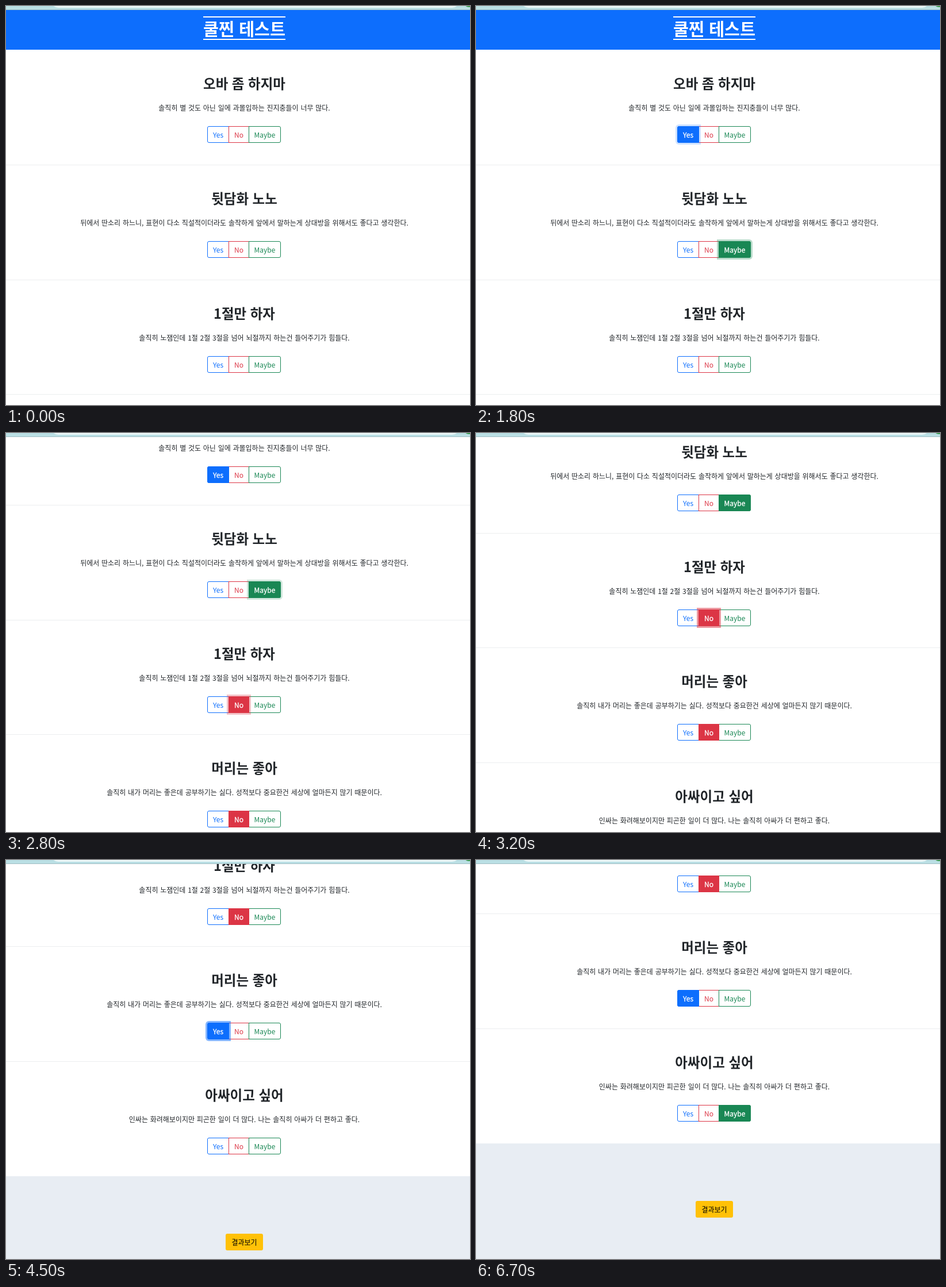
An HTML page that plays this animation: 807x694 px, repeating every 6800 ms.

```html
<!DOCTYPE html>
<html lang="ko">
<head>
<meta charset="utf-8">
<title>쿨찐 테스트</title>
<style>
  * { box-sizing: border-box; margin: 0; }
  html, body { width: 100%; height: 100%; overflow: hidden; background: #fff; }
  body {
    position: relative;
    font: 12px/18px "Noto Sans CJK KR", "Noto Sans KR", "Noto Sans CJK", "Noto Sans", sans-serif;
    color: #212529;
  }

  /* Browser strip above the page */
  .bar {
    position: absolute; z-index: 5; inset: 0 0 auto; height: 7px; overflow: hidden;
    background: #badfe4; border-bottom: 1px solid #a3bfc4;
  }
  .bar::before {
    content: ""; position: absolute; left: 78px; top: -23px; width: 711px; height: 26px;
    border-radius: 13px; background: #edf8f9;
  }
  .bar::after {
    content: ""; position: absolute; left: 796px; top: -16px; width: 18px; height: 18px;
    border-radius: 50%; background: #3c9a50;
  }

  /* The page is a little wider than the stage */
  .page {
    position: absolute; left: 0; top: 7px; width: 829px; text-align: center;
    animation: scroll 6.8s step-end infinite;
  }
  header { height: 69px; padding-top: 11px; background: #0d6efd; }
  h1 {
    display: inline-block; height: 41px; border: solid #fff; border-width: 2px 0;
    font-size: 29.3px; line-height: 36px; font-weight: 700; color: #fff; white-space: nowrap;
  }
  section { position: relative; height: 199.75px; padding-top: 44px; }
  section + section { border-top: 1px solid #eceeef; padding-top: 43px; }
  h2 { font-size: 23.5px; line-height: 29px; font-weight: 700; }
  p { margin-top: 19px; word-spacing: .4px; white-space: nowrap; }

  .group { display: flex; width: 128px; margin: 23px 0 0 350px; isolation: isolate; }
  .group b {
    position: relative; height: 29px; line-height: 27px; font-weight: 400;
    border: 1px solid var(--c); color: var(--c); border-radius: var(--r);
  }
  .group b + b { margin-left: -1px; }
  .yes { width: 38px; --c: #0d6efd; --glow: #0d6efd80; --r: 3px 0 0 3px; }
  .no { width: 36px; --c: #dc3545; --glow: #dc354580; --r: 0; }
  .maybe { width: 56px; --c: #198754; --glow: #19875480; --r: 0 3px 3px 0; }

  /* ::before is the filled state, ::after the focus ring */
  .group b::before, .group b::after {
    position: absolute; inset: -1px; border-radius: var(--r); opacity: 0;
  }
  .group b::before {
    content: attr(data-t); z-index: 1; border: 1px solid var(--c); background: var(--c);
    color: #fff; -webkit-text-stroke: .3px #fff;
    animation: var(--fill, none) 6.8s step-end infinite;
  }
  .group b::after {
    content: ""; z-index: 2; box-shadow: 0 0 0 3px var(--glow);
    animation: var(--ring, none) 6.8s step-end infinite;
  }

  footer { height: 320px; padding-top: 100px; background: #e8edf3; }
  .result {
    display: inline-block; width: 65px; height: 29px; line-height: 29px;
    border-radius: 3px; background: #ffc107; color: #000;
  }

  @keyframes scroll {
    0% { transform: none; }
    29.41% { transform: translateY(-67px); }
    30.88% { transform: translateY(-133px); }
    32.35% { transform: translateY(-151px); }
    45.58% { transform: translateY(-230px); }
    47.05%, 48.52% { transform: translateY(-302px); }
    63.23% { transform: translateY(-340px); }
    64.7% { transform: translateY(-453px); }
    66.17% { transform: translateY(-525px); }
    67.64% { transform: translateY(-527px); }
    69.11% { transform: translateY(-528px); }
    79.41% { transform: translateY(-567px); }
    80.88%, 100% { transform: translateY(-582px); }
  }

  /* The pointer sweeps over the first group from right to left */
  @keyframes maybe1 {
    8.82% { opacity: .6; } 10.29% { opacity: .5; } 11.76% { opacity: .1; }
    13.23% { opacity: .03; } 14.7%, 100% { opacity: 0; }
  }
  @keyframes no1 {
    10.29%, 11.76% { opacity: .6; } 13.23% { opacity: .05; } 14.7%, 100% { opacity: 0; }
  }
  @keyframes yes1 { 11.76% { opacity: .6; } 13.23%, 100% { opacity: 1; } }
  @keyframes ring1 {
    14.7% { opacity: .6; } 16.17% { opacity: 1; }
    26.47% { opacity: .4; } 27.94%, 100% { opacity: 0; }
  }

  @keyframes maybe2 { 22.05% { opacity: .6; } 23.52%, 100% { opacity: 1; } }
  @keyframes ring2 {
    26.47% { opacity: .6; } 27.94% { opacity: 1; }
    41.17% { opacity: .4; } 42.64%, 100% { opacity: 0; }
  }

  @keyframes no3 { 38.23% { opacity: .6; } 39.7%, 100% { opacity: 1; } }
  @keyframes ring3 {
    41.17% { opacity: .6; } 42.64% { opacity: 1; }
    58.82% { opacity: .4; } 60.29%, 100% { opacity: 0; }
  }

  @keyframes no4 { 0% { opacity: 1; } 58.82% { opacity: .4; } 60.29%, 100% { opacity: 0; } }
  @keyframes yes4 { 52.94% { opacity: .6; } 54.41%, 100% { opacity: 1; } }
  @keyframes ring4 {
    58.82% { opacity: .6; } 60.29% { opacity: 1; }
    75% { opacity: .4; } 76.47%, 100% { opacity: 0; }
  }

  @keyframes maybe5 { 73.52% { opacity: .6; } 75%, 100% { opacity: 1; } }
  @keyframes ring5 {
    75% { opacity: .6; } 76.47% { opacity: 1; } 98.52%, 100% { opacity: 0; }
  }
</style>
</head>
<body>
<div class="bar"></div>
<main class="page">
  <header><h1>쿨찐 테스트</h1></header>

  <section>
    <h2>오바 좀 하지마</h2>
    <p>솔직히 별 것도 아닌 일에 과몰입하는 진지충들이 너무 많다.</p>
    <div class="group">
      <b class="yes" data-t="Yes" style="--fill: yes1; --ring: ring1">Yes</b>
      <b class="no" data-t="No" style="--fill: no1">No</b>
      <b class="maybe" data-t="Maybe" style="--fill: maybe1">Maybe</b>
    </div>
  </section>

  <section>
    <h2>뒷담화 노노</h2>
    <p>뒤에서 딴소리 하느니, 표현이 다소 직설적이더라도 솔작하게 앞에서 말하는게 상대방을 위해서도 좋다고 생각한다.</p>
    <div class="group">
      <b class="yes" data-t="Yes">Yes</b>
      <b class="no" data-t="No">No</b>
      <b class="maybe" data-t="Maybe" style="--fill: maybe2; --ring: ring2">Maybe</b>
    </div>
  </section>

  <section>
    <h2>1절만 하자</h2>
    <p>솔직히 노잼인데 1절 2절 3절을 넘어 뇌절까지 하는건 들어주기가 힘들다.</p>
    <div class="group">
      <b class="yes" data-t="Yes">Yes</b>
      <b class="no" data-t="No" style="--fill: no3; --ring: ring3">No</b>
      <b class="maybe" data-t="Maybe">Maybe</b>
    </div>
  </section>

  <section>
    <h2>머리는 좋아</h2>
    <p>솔직히 내가 머리는 좋은데 공부하기는 싫다. 성적보다 중요한건 세상에 얼마든지 많기 때문이다.</p>
    <div class="group">
      <b class="yes" data-t="Yes" style="--fill: yes4; --ring: ring4">Yes</b>
      <b class="no" data-t="No" style="--fill: no4">No</b>
      <b class="maybe" data-t="Maybe">Maybe</b>
    </div>
  </section>

  <section>
    <h2>아싸이고 싶어</h2>
    <p>인싸는 화려해보이지만 피곤한 일이 더 많다. 나는 솔직히 아싸가 더 편하고 좋다.</p>
    <div class="group">
      <b class="yes" data-t="Yes">Yes</b>
      <b class="no" data-t="No">No</b>
      <b class="maybe" data-t="Maybe" style="--fill: maybe5; --ring: ring5">Maybe</b>
    </div>
  </section>

  <footer><span class="result">결과보기</span></footer>
</main>
</body>
</html>
```
